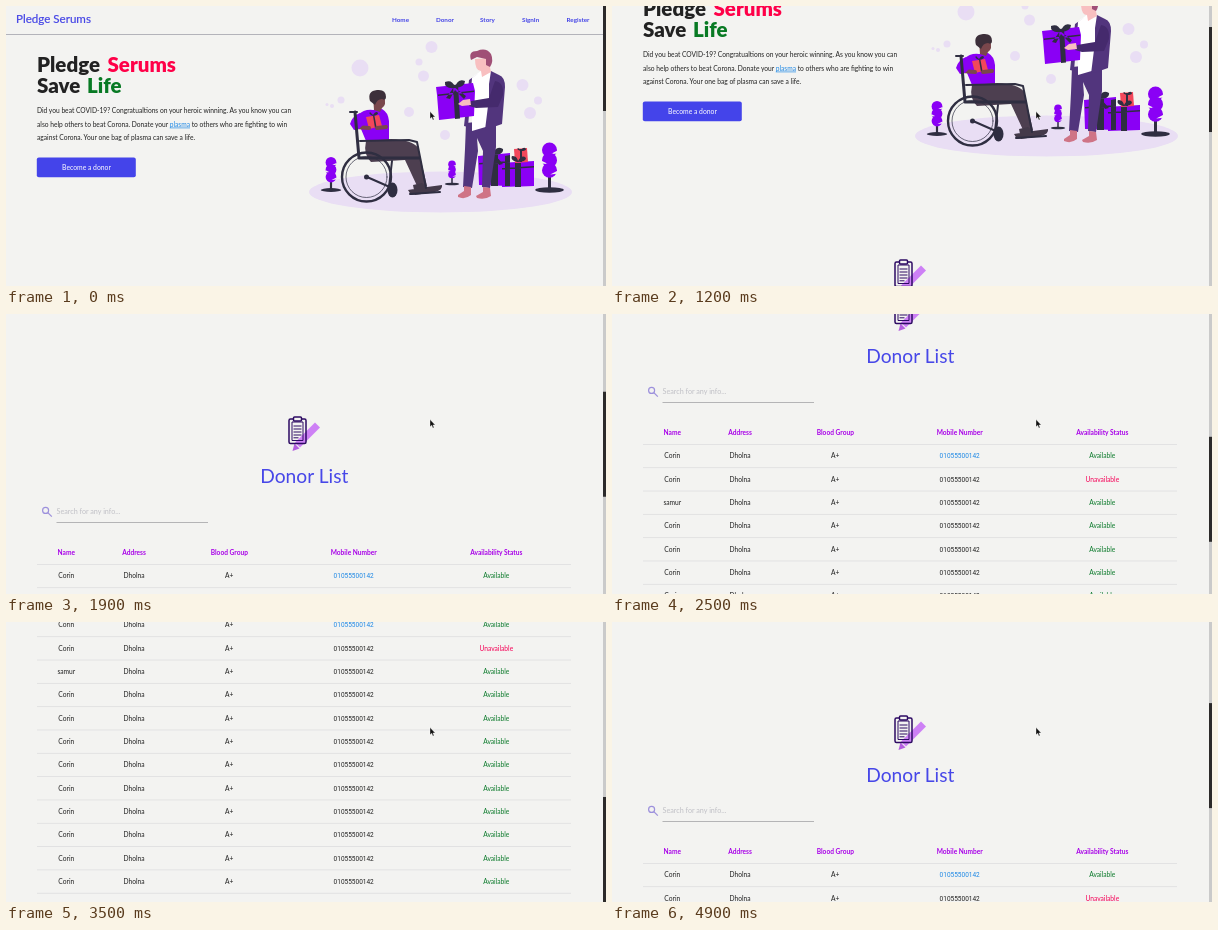
Write an HTML page that moves like this. It is 600x280 px and loops after 5000 ms.

```html
<!DOCTYPE html>
<html lang="en">
<head>
<meta charset="utf-8">
<title>Donor List</title>
<style>
  html, body { margin: 0; width: 100%; height: 100%; overflow: hidden; background: #f3f3f1; }
  svg { display: block; width: 600px; height: 280px; font-family: Lato, sans-serif; font-size: 6.67px; fill: #222; }
  .nav { font-size: 6.3px; font-weight: 700; fill: #4444e6; }
  .brand { font-size: 11.6px; fill: #4444e6; stroke: #4444e6; stroke-width: .2; }
  .hero { font-size: 20.5px; font-weight: 900; }
  .mid { text-anchor: middle; }
  .head { font-size: 6.6px; font-weight: 700; fill: #a800e8; }
  .num { font-family: Roboto, sans-serif; font-size: 6.5px; }
  .shade { fill: #e9def4; }
  .vio { fill: #8a00f5; }
  .dark { fill: #2f2e41; }
  .suit { fill: #52357d; }
  .skin { fill: #cf7486; }
  .brown { fill: #7a474c; }
  .line { fill: none; stroke: #2f2e41; stroke-linecap: round; stroke-linejoin: round; }
</style>
</head>
<body>
<svg viewBox="0 0 600 280">
  <rect width="600" height="280" fill="#f3f3f1"/>
  <g id="page">
    <text class="brand" x="10" y="17.3">Pledge Serums</text>
    <g class="nav" id="nav"></g>
    <rect y="28" width="597" height="1" fill="#b3b3ba"/>

    <g class="hero">
      <text x="31" y="65.5">Pledge</text><text x="101.500" y="65.5" fill="#ff0048">Serums</text>
      <text x="31" y="87">Save</text><text x="81" y="87" fill="#087a24">Life</text>
    </g>
    <text x="31" y="107.3">Did you beat COVID-19? Congratualtions on your heroic winning. As you know you can</text>
    <text x="31" y="120.6">also help others to beat Corona. Donate your <tspan fill="#1e88e5" text-decoration="underline">plasma</tspan> to others who are fighting to win</text>
    <text x="31" y="133.8">against Corona. Your one bag of plasma can save a life.</text>
    <rect x="30.800" y="151.500" width="99" height="19.700" rx="2" fill="#4444ea"/>
    <text class="mid" x="80.5" y="163.6" fill="#fff" font-size="6.8">Become a donor</text>

    <g id="scene">
      <ellipse class="shade" cx="434.5" cy="186" rx="131.5" ry="20.5"/>
      <g class="shade" id="bubbles"></g>
      <g id="plants"></g>

      <!-- gifts on the floor -->
      <path class="vio" d="M472 150l32-3v33l-31-1zM495 157l33-2v25l-32 1z"/>
      <path fill="#f2475b" d="M508 143l13-1 1 14-13 1z"/>
      <path class="dark" d="M485 149h7v31h-7zM499 150l5-1v31h-5zM473 157l31-2v1.500l-31 2zM509 157h6v24h-6zM496 162l32-2v1.500l-32 2zM514 143h2v13h-2z"/>
      <path class="dark" d="M487 149q-11-1-9-7q6-1 9 6q3-9 10-5q1 6-10 6zM488 148l9 10-4 1-5-8-6 8-3-2zM511 156q-7-2-5-6q5 0 6 5q4-7 8-3q0 4-9 4zM515 145q-5-1-3-3l3 2q3-4 5-1q0 2-5 2z"/>

      <!-- sitter -->
      <path class="vio" d="M352 109q6-6 15-5l9-1q6 3 7 12l0 19-23 1-5-12z"/>
      <path class="brown" d="M367 90h11q3 9-2 12l-2 4-6-2z"/>
      <path d="M364 95q-3-10 7-11q9-1 9 7q0 4-4 2q-5 0-7 6z" fill="#3c2f3a"/>
      <path d="M360 135l25-2q22 1 27 9l9 38-9 2-13-28-34 2q-8-7-5-21z" fill="#4d3f50"/>
      <path fill="#f2475b" d="M360 111l13-2 3 11-13 3z"/>
      <path class="dark" d="M367 110h1.500l2 11-1.500 1zM367 110q-5-2-3-4l3 3q3-5 5-2q0 2-5 3z"/>
      <path d="M350 121l13 1M380 121l-9 1" fill="none" stroke="#7a474c" stroke-width="4" stroke-linecap="round"/>
      <path class="vio" d="M354 107q-8 3-10 11l4 6 5-1 7-7z"/>
      <path d="M407 179l9-2 5 4 15-2q1 5-7 7l-20 3zM402 184l12-2 10 5-19 2z" fill="#443a4a"/>

      <!-- wheelchair -->
      <g class="line">
        <circle cx="360.5" cy="171" r="24.5" stroke-width="2.4"/>
        <circle cx="360.5" cy="171" r="20.500" stroke-width=".7"/>
        <path stroke-width="3" d="M349 106l4 46h60"/>
        <path stroke-width="2" d="M344 106h7M354 135l49-1 8 2 4 20 5 26M386 155l-3 26M361 171l25 11M404 188l30-2"/>
      </g>
      <ellipse class="dark" cx="386.5" cy="184" rx="5" ry="7.500"/>
      <circle class="dark" cx="360.5" cy="171" r="2.5"/>

      <!-- standing man -->
      <path class="suit" d="M460 117l30-3 0 27-6 41-8-1 1-36-6-13 1 13-6 37-9-1 2-38z"/>
      <path class="skin" d="M458 180l7 1 0 8q-6 5-13 2l0-2 6-4zM477 181l7 1 1 8q-6 4-14 2l-1-2 7-4z"/>
      <path fill="#fff" d="M466 71l9-6 12 2-4 53-17 5z"/>
      <path fill="#f8bfc0" d="M469 53l13-1 3 14-9 5-1-6q-6 0-6-12z"/>
      <path fill="#a04f76" d="M465 54q-3-9 6-9q9-4 14 3q3 7-1 13l-4-2 0-6-9-2z"/>
      <path class="suit" d="M485 65l8 4q6 2 6 12l-3 37-17 6 4-32 0-14zM473 67l-7 5-4 49-4-1 5-46z"/>

      <!-- gift between them -->
      <path class="vio" d="M430 81l37-4 2 8-1 25-35 4-2-25z"/>
      <path class="dark" d="M432 88.500l36-4v1.500l-36 4zM447 79l5-.5 2 34-5 .6zM449 82q-11 1-10-6q7-3 10 5q3-9 10-6q0 6-10 7zM448 81l-8 11 4 1 5-9 9 9 2-3z"/>
      <path fill="#452a6d" d="M489 75q9 1 8 14l-5 12-22 1-7-2 2-5 18-3z"/>
      <path fill="#f8bfc0" d="M457 94l7-1 1 6-9 1-4-2z"/>
    </g>

    <g transform="translate(282 311)">
      <path d="M27 4.5l5 5-20 20-5-5z" fill="#cd80f5"/>
      <path d="M6.5 25.5l5 5-7 2.5z" fill="#b45ee0"/>
      <g fill="none" stroke="#2d0a63" stroke-width="1.5">
        <rect x="1" y="1" width="17" height="24.5" rx="1.5"/>
        <path d="M4 4h11v18.500h-11z" stroke-width="1"/>
        <path d="M5.500 8h8M5.500 11h8M5.500 14h8M5.500 17h8M5.500 19.800h5" stroke-width="1"/>
        <rect x="5.500" y="-1" width="8" height="4" rx="1" fill="#f3f3f1"/>
      </g>
    </g>
    <text class="mid" x="298.3" y="376" font-size="19.2" fill="#4747e8">Donor List</text>
    <g fill="none" stroke="#9c90dc" stroke-width="1.2">
      <circle cx="39.600" cy="403.400" r="3"/><path d="M41.800 405.600l4 4"/>
    </g>
    <text x="50.500" y="407.300" font-size="7.2" fill="#c0c0c6">Search for any info...</text>
    <rect x="50.500" y="415" width="151.500" height=".8" fill="#a5a5a8"/>
    <g class="mid" id="table"></g>
  </g>

  <rect x="597" width="3" height="280" fill="#cacaca"/>
  <rect id="thumb" x="597" width="3" height="105" fill="#2c2a2a"/>
  <path d="M424 105.500v7.300l1.700-1.500 1.200 2.700 1.200-.5-1.200-2.600h2.300z" fill="#111" stroke="#fff" stroke-width=".35"/>
</svg>
<script>
  const NS = "http://www.w3.org/2000/svg";
  const $ = id => document.getElementById(id);

  function add(parent, tag, attrs, text) {
    const el = document.createElementNS(NS, tag);
    for (const key in attrs) el.setAttribute(key, attrs[key]);
    if (text) el.textContent = text;
    return parent.appendChild(el);
  }

  const links = { Home: 386, Donor: 430, Story: 474, SignIn: 516, Register: 560.5 };
  for (const name in links) add($("nav"), "text", { x: links[name], y: 15.8 }, name);

  const bubbles = [
    [354, 62, 8.5], [425.5, 41, 6], [417.5, 70, 5.5], [413, 56, 3.5], [403, 106, 5],
    [335, 94, 3.5], [326, 100, 2], [321, 98.5, 1.5], [439, 129, 5],
    [516.5, 79, 6], [532, 94.5, 4], [524, 107, 6]
  ];
  for (const [cx, cy, r] of bubbles) add($("bubbles"), "circle", { cx, cy, r });

  // Three stacked balls on a stem, each with a notch on alternate sides.
  function plant(x, top, base, r) {
    const g = $("plants"), gap = r * 1.35;
    add(g, "ellipse", { cx: x, cy: base, rx: r * 1.9, ry: r * .36, class: "dark" });
    add(g, "path", { d: `M${x} ${top + r}V${base}`, class: "line", "stroke-width": r * .4 });
    for (let i = 0; i < 3; i++) {
      const y = top + r + i * gap, side = i % 2 ? -1 : 1;
      add(g, "circle", { cx: x, cy: y, r, class: "vio" });
      add(g, "path", {
        d: `M${x + side * r} ${y + r * .1}l${-side * r * .9} ${r * .45}l${side * r * .9} ${-r * .1}z`,
        fill: "#f3f3f1"
      });
    }
  }
  plant(325, 151, 184, 5.4);
  plant(446, 154.5, 178, 3.8);
  plant(543.5, 136.5, 184, 7.5);

  const columns = [60.3, 128, 223.3, 347.7, 490.3];
  const pitch = 23.32, firstRow = 469;
  const table = $("table");

  function row(y, cells, style) {
    cells.forEach((text, i) => add(table, "text", { x: columns[i], y: y + 2.3, ...style(i) }, text));
    add(table, "rect", { x: 31, y: y + 11.3, width: 534, height: .8, fill: "#dededf" });
  }

  row(firstRow - pitch, ["Name", "Address", "Blood Group", "Mobile Number", "Availability Status"],
    () => ({ class: "head" }));
  for (let n = 0; n < 12; n++) {
    const free = n !== 1;
    const cells = [n === 2 ? "samur" : "Corin", "Dholna", "A+", "01055500142", free ? "Available" : "Unavailable"];
    row(firstRow + n * pitch, cells, i => {
      if (i === 3) return { class: "num", fill: n ? "#222" : "#1e88e5" };
      return { fill: i < 4 ? "#222" : free ? "#0b7a2b" : "#f50057" };
    });
  }

  // Wheel gestures: start time, then the scroll offset at each 100 ms step.
  const LOOP = 5000, STEP = 100;
  const gestures = [
    [700, 6, 28, 41],
    [1100, 43, 56, 80, 106, 122],
    [1700, 132, 164, 207, 248, 276, 286],
    [2300, 293, 314, 327],
    [2700, 331, 350, 376, 398, 409],
    [3300, 418, 446, 466],
    [4100, 458, 423, 367, 300, 257],
    [4700, 250, 232, 216]
  ];

  function scrollAt(t) {
    let y = 0;
    for (const [start, ...stops] of gestures) {
      if (t < start) break;
      y = stops[Math.min(Math.floor((t - start) / STEP), stops.length - 1)];
    }
    return y;
  }

  const page = $("page"), thumb = $("thumb");
  const begin = performance.now();

  function draw() {
    const y = scrollAt((performance.now() - begin) % LOOP);
    page.setAttribute("transform", `translate(0 ${-y})`);
    thumb.setAttribute("y", y * .3755);
    requestAnimationFrame(draw);
  }
  draw();
</script>
</body>
</html>
```
